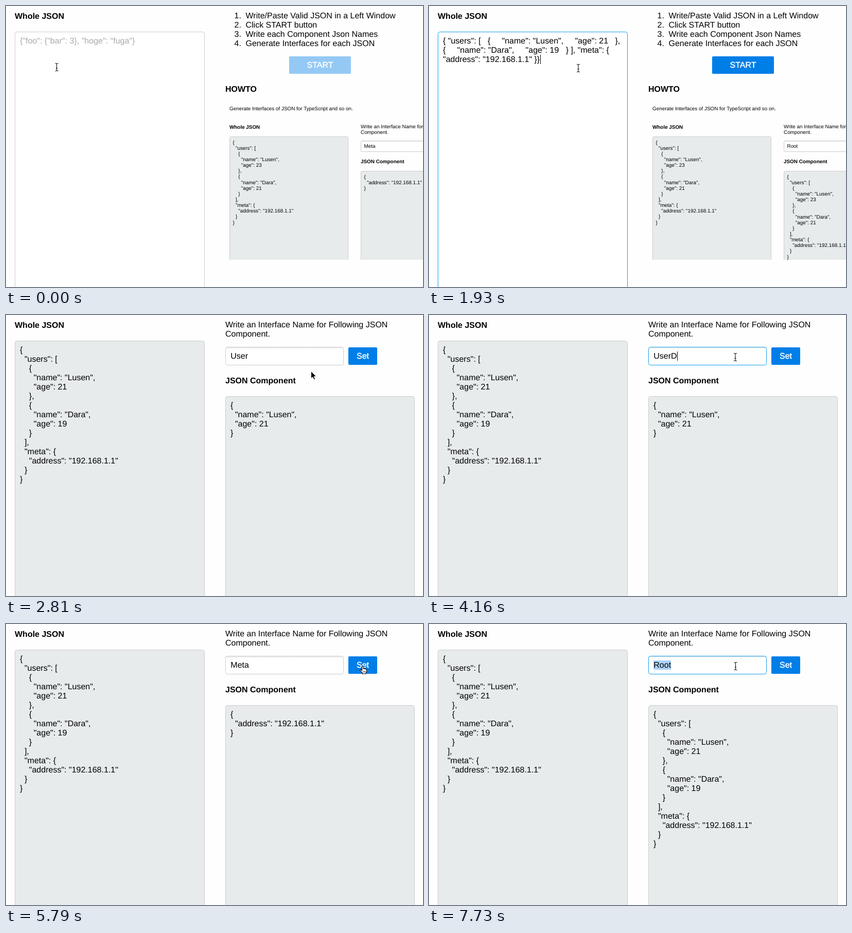
Recreate the animation shown at these times as an HTML page. Size 810 by 547 pixels, loop 8 s.

```html
<!DOCTYPE html>
<html lang="en">
<head>
<meta charset="utf-8">
<title>JSON interface generator</title>
<style>
  html, body { margin: 0; width: 100%; height: 100%; overflow: hidden; background: #fefefe; }
  svg { display: block; width: 810px; height: 547px; }
  text {
    font-family: "Liberation Sans", Arial, Helvetica, sans-serif;
    white-space: pre;
    text-rendering: geometricPrecision;
  }
  .bold { font-weight: bold; }
  .hint { fill: #a9a9a9; }
  .label { fill: #fff; stroke: #fff; stroke-width: .45px; text-anchor: middle; }
</style>
</head>
<body>
<svg id="stage" viewBox="0 0 810 547">
  <defs>
    <linearGradient id="shade" x2="0" y2="1">
      <stop offset="0" stop-opacity="0"/>
      <stop offset=".4" stop-opacity=".05"/>
      <stop offset="1" stop-opacity=".1"/>
    </linearGradient>
    <linearGradient id="inset" x2="0" y2="1">
      <stop offset="0" stop-color="#e4e4e4"/>
      <stop offset=".12" stop-color="#fff"/>
    </linearGradient>
    <clipPath id="demoClip"><path d="M426 180H810V494H426z"/></clipPath>
  </defs>
  <g id="view"></g>
</svg>
<script>
const LOOP = 8000, BIG = 16, SMALL = 9.9;
const BLUE = '#129fea', GREY = '#ccc', PANEL = '#e7ebec';

const text = (x, y, str, size = BIG, cls = '') =>
  `<text x="${x}" y="${y}" font-size="${size}" class="${cls}">${str}</text>`;

const lines = (x, y, rows, size = BIG, step = 18) =>
  rows.map((row, i) => text(x, y + i * step, row, size)).join('');

const box = (x, y, w, h, fill, line = GREY, r = 4) =>
  `<rect x="${x + .5}" y="${y + .5}" width="${w - 1}" height="${h - 1}" rx="${r}" fill="${fill}" stroke="${line}"/>`;

const caret = (x, y, h = 18) => `<path d="M${x + .5} ${y}v${h}" stroke="#000"/>`;

function button(x, y, w, label, mode) {
  const rect = fill => `<rect x="${x}" y="${y}" width="${w}" height="34" rx="2" fill="${fill}"/>`;
  const over = mode === 'hover' || mode === 'down' ? rect('url(#shade)') : '';
  const ring = mode === 'down' ? box(x, y, w, 34, 'none', 'rgba(0,0,0,.2)', 2) : '';
  return `<g opacity="${mode === 'off' ? .42 : 1}">${rect('#007ee8')}${over}${ring}</g>` +
    text(x + w / 2, y + 22, label, BIG, 'label');
}

const pretty = data => JSON.stringify(data, null, 2).split('\n');
const tree = (a, b) => ({
  users: [{ name: 'Lusen', age: a }, { name: 'Dara', age: b }],
  meta: { address: '192.168.1.1' }
});
const data = tree(21, 19), demoData = tree(23, 21);
const parts = { User: data.users[0], Meta: data.meta, Root: data };
const pasted = [
  '{ "users": [   {     "name": "Lusen",     "age": 21   },',
  '{     "name": "Dara",     "age": 19   } ], "meta": {',
  '"address": "192.168.1.1" }}'
];

const pointers = {
  beam: `<path d="M-3-7.5q2 0 3 1q1-1 3-1M-3 7.5q2 0 3-1q1 1 3 1M0-6.5v13M-2 2h4" fill="none" stroke="#fff" stroke-width="2.4" opacity=".7"/>
    <path d="M-3-7.5q2 0 3 1q1-1 3-1M-3 7.5q2 0 3-1q1 1 3 1M0-6.5v13M-1.7 2h3.4" fill="none" stroke="#111" stroke-width="1.1"/>`,
  arrow: '<path d="M.5.5V14.8L3.8 11.7L6.2 17L8.6 16L6.3 10.8H10.8z" stroke="#fff"/>',
  hand: `<path d="M4.5 9.6V1.8a1.3 1.3 0 0 1 2.6 0V6q1.5-.9 2.4.4q1.4-.8 2.2.5q1.8-.5 1.8 1.4v2.5q0 2-1.2 3.2v2H5.5v-1.5L1 9.5q-.6-1.6 1-1.6q1.2 0 2.5 1.7z" fill="#fff" stroke="#000" stroke-width="1.1"/>
    <path d="M7.2 10.5v3M9 10.5v3M10.8 10.5v3" stroke="#000" stroke-width=".8"/>`
};
const pointer = (kind, x, y, scale = 1) =>
  `<g transform="translate(${x} ${y}) scale(${scale})">${pointers[kind]}</g>`;

// The small walkthrough picture below HOWTO
function demo(s) {
  const focus = s.demoFocus;
  const rows = pretty(s.demo === 'Meta' ? demoData.meta : demoData);
  return `<g clip-path="url(#demoClip)">` +
    text(434, 202.5, 'Generate Interfaces of JSON for TypeScript and so on.', SMALL) +
    text(434, 239, 'Whole JSON', SMALL, 'bold') +
    box(434, 254, 231, 300, PANEL, GREY, 2.5) +
    lines(440.4, 268.6, pretty(demoData), SMALL, 11.14) +
    lines(689, 238.3, ['Write an Interface Name for Following JSON', 'Component.'], SMALL, 11.1) +
    box(689, 262, 142, 22, 'url(#inset)', focus ? BLUE : GREY, 2.5) +
    (focus === 'all' ? '<rect x="695" y="267" width="22" height="11" fill="#acd2fb"/>' : '') +
    text(695.5, 276, s.demo, SMALL) +
    (focus === 'type' ? caret(s.demo.length > 1 ? 708 : 703, 267, 11) : '') +
    (focus ? pointer('beam', 808, 272.5, .65) : '') +
    text(689, 305.5, 'JSON Component', SMALL, 'bold') +
    box(689, 321, 231, 300, PANEL, GREY, 2.5) +
    lines(695.4, 335.6, rows, SMALL, 11.14) + '</g>';
}

function startPage(s) {
  const steps = ['Write/Paste Valid JSON in a Left Window', 'Click START button',
    'Write each Component Json Names', 'Generate Interfaces for each JSON'];
  return box(17, 50, 369, 600, '#fff', s.focus ? BLUE : GREY) +
    (s.pasted ? lines(27, 73, pasted) : text(27, 73, '{"foo": {"bar": 3}, "hoge": "fuga"}', BIG, 'hint')) +
    (s.caret ? s.pasted ? caret(216, 95) : caret(28, 59) : '') +
    lines(443.5, 24, steps.map((_, i) => i + 1 + '.')) +
    lines(465.5, 24, steps) +
    button(550, 98, 120, 'START', s.button) +
    text(426, 167, 'HOWTO', BIG, 'bold') + demo(s);
}

function namePage(s) {
  return box(17, 50, 369, 600, PANEL) + lines(27, 73, pretty(data)) +
    lines(426, 24, ['Write an Interface Name for Following JSON', 'Component.']) +
    box(426, 62, 230, 36, 'url(#inset)', s.focus ? BLUE : GREY) +
    (s.selected ? '<rect x="436" y="71" width="34" height="18" fill="#acd2fb"/>' : '') +
    text(436.3, 85, s.name) +
    (s.caret ? caret(s.caret, 71) : '') +
    button(665, 63, 56, 'Set', s.button) +
    text(426, 133, 'JSON Component', BIG, 'bold') +
    box(426, 158, 368, 600, PANEL) + lines(436, 181, pretty(parts[s.part]));
}

// Each step changes part of the state
const script = [
  [0, { page: startPage, button: 'off', demo: 'Meta', at: ['beam', 98.5, 119] }],
  [140, { at: ['beam', 88.5, 114] }],
  [590, { focus: true, caret: true }],
  [1040, { demo: 'Root' }],
  [1190, { caret: false }],
  [1630, { pasted: true, caret: true, button: 'on' }],
  [1780, { at: ['beam', 150, 117] }],
  [1930, { at: ['beam', 290, 121] }],
  [2080, { at: ['arrow', 430, 116], demoFocus: 'all' }],
  [2220, { at: ['arrow', 526, 112], caret: false }],
  [2370, { at: ['hand', 578, 111], button: 'hover', demo: 'U', demoFocus: 'type' }],
  [2520, { at: ['hand', 589, 110] }],
  [2670, { demo: 'Us', caret: true }],
  [2810, { page: namePage, name: 'User', part: 'User', focus: false, caret: 0, button: 'on', at: ['arrow', 592, 109] }],
  [3110, { at: ['arrow', 593, 102] }],
  [3260, { at: ['beam', 595, 89] }],
  [3410, { at: ['beam', 595, 82] }],
  [3560, { focus: true, caret: 470 }],
  [3860, { caret: 0 }],
  [4160, { name: 'UserD', caret: 482 }],
  [4310, { name: 'UserDa', caret: 491 }],
  [4610, { name: 'UserDat', caret: 495 }],
  [4760, { name: 'UserData', caret: 504 }],
  [4910, { at: ['beam', 625, 83] }],
  [5060, { at: ['hand', 667, 81], button: 'hover' }],
  [5200, { at: ['hand', 683, 81], caret: 0 }],
  [5350, { at: ['hand', 687, 81] }],
  [5640, { focus: false, button: 'down' }],
  [5790, { name: 'Meta', part: 'Meta', button: 'on' }],
  [6840, { name: 'Root', part: 'Root' }],
  [6990, { at: ['hand', 670, 80] }],
  [7130, { at: ['beam', 622, 83] }],
  [7280, { at: ['beam', 595.5, 82] }],
  [7580, { focus: true, caret: 470 }],
  [7730, { selected: true, caret: 0 }]
];

const view = document.getElementById('view');
let shown = -1;

function draw(now) {
  const t = now % LOOP;
  const step = script.filter(([from]) => from <= t).length;
  if (step !== shown) {
    shown = step;
    const s = Object.assign({}, ...script.slice(0, step).map(([, change]) => change));
    view.innerHTML = text(17, 25, 'Whole JSON', BIG, 'bold') + s.page(s) + pointer(...s.at);
  }
}

function tick() {
  draw(performance.now());
  requestAnimationFrame(tick);
}
tick();
</script>
</body>
</html>
```
